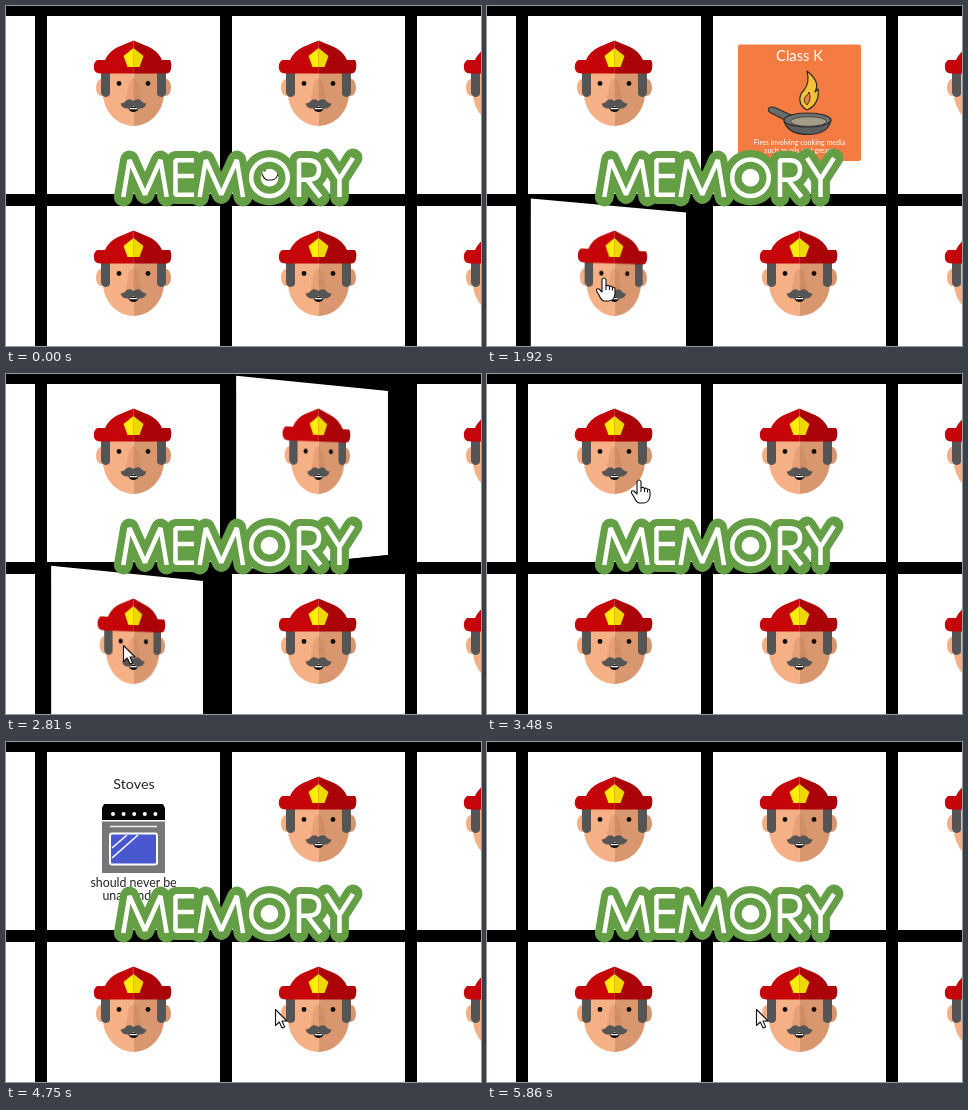
Animation, 475 px wide and 340 px high, one loop 6240 ms. Source, as an HTML page without scripts:

```html
<!DOCTYPE html>
<html lang="en">
<head>
<meta charset="utf-8">
<title>Memory</title>
<style>
html, body { margin: 0; width: 100%; height: 100%; overflow: hidden; background: #000; }
.stage { position: relative; width: 475px; height: 340px; overflow: hidden; background: #000; }
svg { display: block; }

.cell { position: absolute; width: 173px; height: 178px; perspective: 500px; }
.c0 { left: -144px; } .c1 { left: 41px; } .c2 { left: 226px; } .c3 { left: 411px; }
.r1 { top: 10px; } .r2 { top: 200px; }

.card { width: 100%; height: 100%; transform-style: preserve-3d; }
.face { position: absolute; inset: 0; width: 173px; height: 178px; background: #fff; backface-visibility: hidden; }
.rear { transform: rotateY(180deg); }
text { font-family: Lato, "Open Sans", sans-serif; text-anchor: middle; fill: #222; }
.pale { fill: #fff; }

.flip { animation: 6240ms ease-in-out infinite; }
.pan { animation-name: flip-pan; }
.smoke { animation-name: flip-smoke; }
.stove { animation-name: flip-stove; }
.grill { animation-name: flip-grill; }
@keyframes flip-pan {
  0%, 11.22% { transform: rotateY(0); }
  18.43%, 39.86% { transform: rotateY(180deg); }
  47.07%, 100% { transform: rotateY(0); }
}
@keyframes flip-smoke {
  0%, 28.85% { transform: rotateY(0); }
  36.06%, 39.86% { transform: rotateY(180deg); }
  47.07%, 100% { transform: rotateY(0); }
}
@keyframes flip-stove {
  0%, 60.18% { transform: rotateY(0); }
  67.39%, 86.73% { transform: rotateY(180deg); }
  93.91%, 100% { transform: rotateY(0); }
}
@keyframes flip-grill {
  0%, 76.04% { transform: rotateY(0); }
  83.25%, 86.73% { transform: rotateY(180deg); }
  93.91%, 100% { transform: rotateY(0); }
}

.overlay { position: absolute; left: 0; top: 0; }
.pointer { animation: travel 6240ms linear infinite; }
.hand { animation: show-hand 6240ms step-end infinite; }
.arrow { animation: show-arrow 6240ms step-end infinite; }
@keyframes travel {
  0%, 1.1% { transform: translate(261px, 150px); }
  2.2%, 24.2% { transform: translate(262px, 149px); animation-timing-function: ease-in-out; }
  28.8%, 50% { transform: translate(117px, 271px); animation-timing-function: ease-in-out; }
  55.7%, 67.4% { transform: translate(152px, 105px); animation-timing-function: ease-in; }
  70.8% { transform: translate(253px, 254px); }
  72.2%, 100% { transform: translate(269px, 267px); }
}
@keyframes show-hand {
  0% { opacity: 1; } 35.9% { opacity: 0; } 50.8% { opacity: 1; } 67.4%, 100% { opacity: 0; }
}
@keyframes show-arrow {
  0% { opacity: 0; } 35.9% { opacity: 1; } 50.8% { opacity: 0; } 67.4%, 100% { opacity: 1; }
}
</style>
</head>
<body>
<svg width="0" height="0" style="position:absolute">
  <defs>
    <g id="chief">
      <ellipse cx="95" cy="81.500" rx="5" ry="8.500" fill="#f4b084"/>
      <ellipse cx="160" cy="81.500" rx="5" ry="8.500" fill="#d6956f"/>
      <path d="M127.500 60H97V87C97 106 112 120 127.500 120Z" fill="#f6b086"/>
      <path d="M127.500 60H158V87C158 106 143 120 127.500 120Z" fill="#d8976f"/>
      <path d="M127.500 72V95H123Q118 93 121 88L123 76Z" fill="#e9a077"/>
      <path d="M127.500 72V95H132Q137 93 134 88L132 76Z" fill="#cf8e67"/>
      <path d="M95 64H104V88Q103 91 99 91Q95 90 95 86ZM160 64H151V88Q152 91 156 91Q160 90 160 86Z" fill="#555"/>
      <circle cx="113" cy="77.500" r="2.400" fill="#111"/>
      <circle cx="142" cy="77.500" r="2.400" fill="#111"/>
      <path d="M122 101H133Q132 106 127.500 106Q123 106 122 101Z" fill="#111"/>
      <path d="M123.500 102H131.500L131 103.200H124Z" fill="#fff"/>
      <path d="M127.500 95Q124 92 120 94.500Q118 97.500 114.500 97.500Q116 102.500 121 102.500Q125 102.500 127.500 100Q130 102.500 134 102.500Q139 102.500 140.500 97.500Q137 97.500 135 94.500Q131 92 127.500 95Z" fill="#555"/>
      <path d="M127.500 34.500L112 41Q103 45 99 54H91Q87 57 88 63Q89 67.500 95 67.500H127.500Z" fill="#c50509"/>
      <path d="M127.500 34.500L143 41Q152 45 156 54H164Q166 57 165 63Q164 67.500 160 67.500H127.500Z" fill="#aa0308"/>
      <path d="M127.500 42L117.500 50L121.500 61H127.500Z" fill="#ffee0a"/>
      <path d="M127.500 42L137.500 50L133.500 61H127.500Z" fill="#efd800"/>
    </g>
  </defs>
</svg>

<div class="stage">
  <div class="cell c0 r1"><div class="face"></div></div>

  <div class="cell c1 r1"><div class="card flip stove">
    <svg class="face" viewBox="41 10 173 178"><use href="#chief"/></svg>
    <svg class="face rear" viewBox="41 10 173 178">
      <text x="128" y="47" font-size="14.300">Stoves</text>
      <path d="M98 62H157L159 66V78H96V66Z" fill="#050505"/>
      <path d="M107 72H150" stroke="#fff" stroke-width="4" stroke-linecap="round" stroke-dasharray="0 10.600"/>
      <rect x="96" y="79.500" width="63" height="51.500" fill="#777"/>
      <path d="M104 84.500H151" stroke="#eee" stroke-width="1.600"/>
      <rect x="104" y="91.500" width="47" height="31" rx="2" fill="#4a58d0" stroke="#fff" stroke-width="2"/>
      <path d="M106 106L121 93M106 116L132 93" stroke="#fff" stroke-width="1.600"/>
      <text x="127.500" y="145" font-size="12.400">should never be</text>
      <text x="127.500" y="158" font-size="12.400">unattended</text>
    </svg>
  </div></div>

  <div class="cell c2 r1"><div class="card flip pan">
    <svg class="face" viewBox="41 10 173 178"><use href="#chief"/></svg>
    <svg class="face rear" viewBox="226 10 173 178">
      <rect x="251" y="38.500" width="123" height="116.500" rx="2" fill="#f47c43"/>
      <text class="pale" x="312.500" y="55" font-size="14.700">Class K</text>
      <g stroke="#2b2b2b" stroke-width="1.200" stroke-linejoin="round">
        <path d="M320 65C331 74 331 80 328 86L331 83Q333 98 320 104C311 99 311 90 317 84Q323 77 320 65Z" fill="#f5c136"/>
        <path d="M322 86Q325 93 320 99Q315 94 319 90Q322 88 322 86Z" fill="#f47c43" stroke-width=".9"/>
        <path d="M282 102Q285 100 289 102L306 110L302 116L284 107Q280 105 282 102Z" fill="#6a6b6b"/>
        <path d="M297 115C300 125 309 128.500 321 128.500C335 128.500 342 124 344 114Z" fill="#5d5e5e"/>
        <ellipse cx="320.500" cy="114" rx="23.500" ry="7" fill="#6f7070"/>
        <ellipse cx="321.500" cy="115.500" rx="18" ry="4.800" fill="#a39c86" stroke-width=".7"/>
      </g>
      <text class="pale" x="312.500" y="138.500" font-size="7.100">Fires involving cooking media</text>
      <text class="pale" x="312.500" y="147" font-size="7.100">such as oils and grease</text>
    </svg>
  </div></div>

  <div class="cell c3 r1"><svg class="face" viewBox="41 10 173 178"><use href="#chief"/></svg></div>
  <div class="cell c0 r2"><div class="face"></div></div>

  <div class="cell c1 r2"><div class="card flip smoke">
    <svg class="face" viewBox="41 10 173 178"><use href="#chief"/></svg>
    <svg class="face rear" viewBox="41 200 173 178">
      <clipPath id="disc"><circle cx="127.500" cy="286.500" r="38.500"/></clipPath>
      <text x="127.700" y="237" font-size="15.200">Smoke Detector</text>
      <g clip-path="url(#disc)">
        <path d="M88 247H167V326H88Z" fill="#ff7651"/>
        <path d="M159 277L175 293V330H137L97 290Z" fill="#ff4b1c"/>
      </g>
      <path d="M100 289H156L151 304H105Z" fill="#f3f3f3"/>
      <path d="M102 292.500H154M105 298.500H151" stroke="#444" stroke-width="2.400" stroke-dasharray="10 3.500"/>
      <path d="M97 277H128V290H100L97 287Z" fill="#a5a5a7"/>
      <path d="M128 277H159V287L156 290H128Z" fill="#8b8b8d"/>
      <text x="125.700" y="335" font-size="12">Test detectors</text>
    </svg>
  </div></div>

  <div class="cell c2 r2"><div class="card flip grill">
    <svg class="face" viewBox="41 10 173 178"><use href="#chief"/></svg>
    <svg class="face rear" viewBox="226 200 173 178">
      <text x="312.500" y="237.500" font-size="14.400">BBQ &amp; Grills</text>
      <path d="M311 246Q322 255 319 261L322 257Q326 267 319 272H304Q297 265 303 257L305 261Q312 255 311 246Z" fill="#d9532f"/>
      <path d="M312 257Q319 266 315 272H307Q303 267 308 264Q312 262 312 257Z" fill="#ee9548"/>
      <path d="M288 271H336V275H334Q332 291 318 291H306Q292 291 290 275H288Z" fill="#0a0a0a"/>
      <path d="M304 290L297 321M318 290L328 314M300 309H325" stroke="#0a0a0a" stroke-width="3" fill="none"/>
      <circle cx="329" cy="317" r="4.500" fill="#fff" stroke="#0a0a0a" stroke-width="3"/>
      <text x="313.500" y="334" font-size="8">should only be use outdoors</text>
      <text x="313.500" y="342.500" font-size="8">&amp; children should be kept away</text>
    </svg>
  </div></div>

  <div class="cell c3 r2"><svg class="face" viewBox="41 10 173 178"><use href="#chief"/></svg></div>

  <svg class="overlay" width="475" height="340" viewBox="0 0 475 340">
    <g class="pointer" fill="#fff" stroke="#111" stroke-width="1.100" stroke-linejoin="round">
      <path class="arrow" d="M.5 .5V16.500L4.300 13L7 19L9.600 17.900L7 12H12Z"/>
      <path class="hand" d="M-2 2.500Q0-.500 2 2.500V9Q4 7.500 5.500 9.500Q7.500 8.300 8.500 10.500Q11 9.500 11 13V17Q10 23.500 5 24H0Q-3 23-5 18L-7.500 14Q-8 11-5 12L-2 15ZM2 9V13M5.500 9.500V13M8.500 10.500V13.500"/>
    </g>
    <defs>
      <path id="em" d="M117.300 191L123.500 154L139 188.500L154.500 154L160.700 191"/>
      <g id="word">
        <use href="#em"/>
        <path d="M188 154.300H169.500V188.700H188M169.500 170H188"/>
        <use href="#em" x="76.300"/>
        <circle cx="263.500" cy="171.700" r="18.300"/>
        <path d="M293 191V154.300H302Q313 154.300 313 164Q313 173.700 302 173.700H293M301 173.700L314.500 191M320 152L333.500 173V191M347 152L333.500 173"/>
      </g>
    </defs>
    <g fill="none" role="img" aria-label="MEMORY">
      <use href="#word" stroke="#649f46" stroke-width="18.800" stroke-linejoin="round" stroke-linecap="round"/>
      <use href="#word" stroke="#fff" stroke-width="4.500" stroke-linejoin="bevel"/>
    </g>
  </svg>
</div>
</body>
</html>
```
